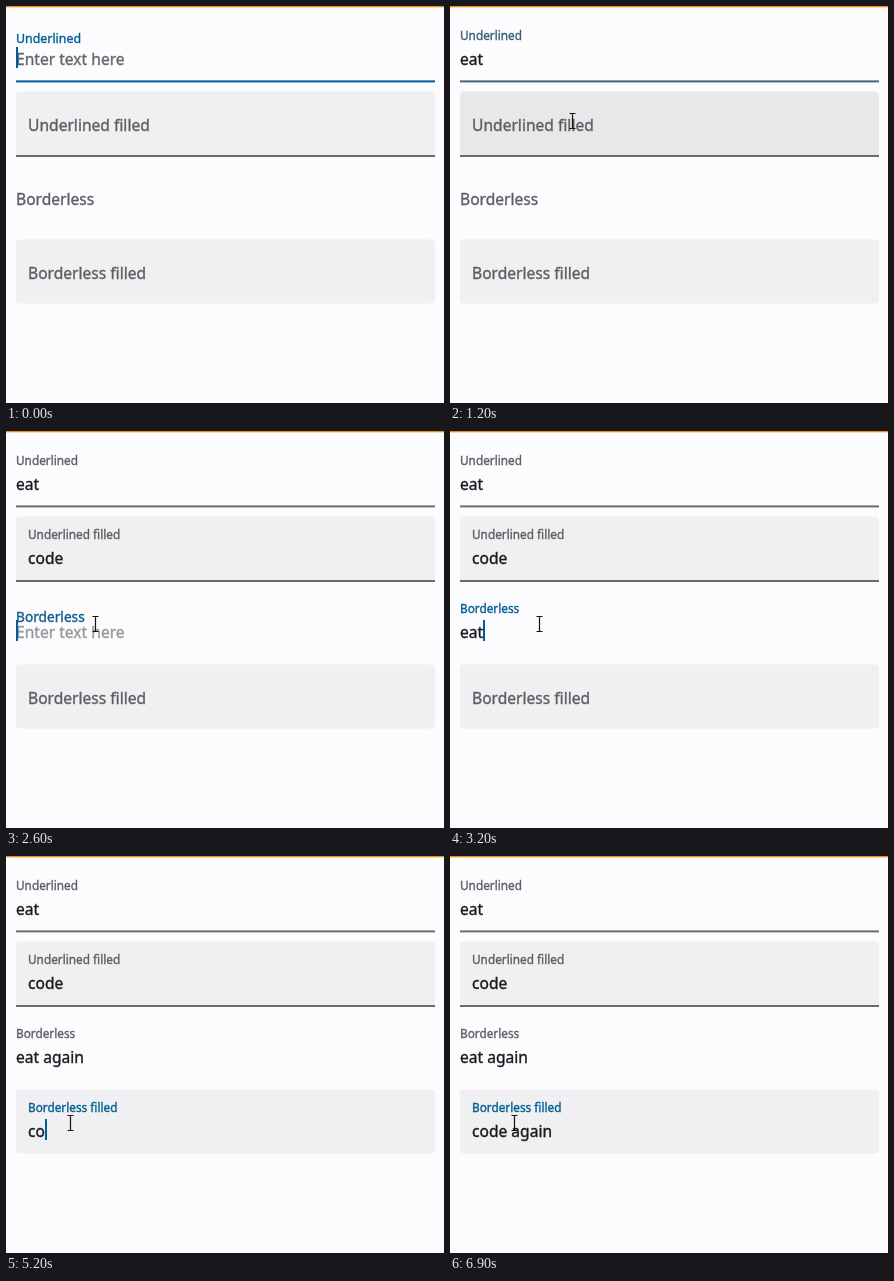
Recreate the animation shown at these times as an HTML page. Size 438 by 397 pixels, loop 7 s.

```html
<!DOCTYPE html>
<html lang="en">
<head>
<meta charset="utf-8">
<title>Text fields</title>
<style>
  html, body { margin: 0; width: 100%; height: 100%; overflow: hidden; background: #fcfcff; }
  svg { display: block; font-family: "Noto Sans", sans-serif; }
  text { white-space: pre; font-size: 15.6px; stroke-width: 0.35px; }
</style>
</head>
<body>
<svg id="stage" width="438" height="397" viewBox="0 0 438 397"></svg>
<script>
const LOOP = 7000, STEP = 100, PITCH = 74;
const BLUE = [0, 93, 147], GRAY = [94, 94, 99], LINE = [107, 106, 111];
const FILL = [240, 240, 242], HOVER = [232, 232, 234];

// keys: [time, typed text]; blinks: [caret off, caret on] intervals
const fields = [
  { label: "Underlined", x: 10, ruleY: 74.4, focus: -150, blur: 1080,
    keys: [[300, "e"], [400, "ea"], [500, "eat"]], blinks: [[700, 1300]] },
  { label: "Underlined filled", x: 22, ruleY: 149, filled: true, hover: [900, 1200], focus: 1200, blur: 2400,
    keys: [[1600, "c"], [1800, "co"], [1900, "cod"], [2000, "code"]], blinks: [[2300, 2500]] },
  { label: "Borderless", x: 10, focus: 2500, blur: 4400,
    keys: [[2900, "e"], [3000, "ea"], [3200, "eat"], [3300, "eat "], [3400, "eat a"],
           [3600, "eat ag"], [3700, "eat aga"], [3800, "eat agai"], [3900, "eat again"]],
    blinks: [[4200, 4500]] },
  { label: "Borderless filled", x: 22, filled: true, hover: [4300, 4500], focus: 4500, blur: LOOP + 1000,
    keys: [[5100, "c"], [5200, "co"], [5300, "cod"], [5500, "code"], [5700, "code "],
           [6100, "code a"], [6400, "code ag"], [6500, "code agai"], [6600, "code again"]],
    blinks: [[4800, 5000], [6900, 7000]] }
];

// pointer stops: [time, x, y]
const stops = [[900, 127, 66], [1100, 122, 115], [2200, 122, 115], [2500, 89, 193],
               [4200, 89, 193], [4300, 89, 194], [4500, 64, 267], [LOOP, 64, 267]];

const stage = document.getElementById("stage");

function add(tag, attrs) {
  const el = document.createElementNS("http://www.w3.org/2000/svg", tag);
  stage.append(el);
  return set(el, attrs);
}
function set(el, attrs) {
  for (const name in attrs) el.setAttribute(name, attrs[name]);
  return el;
}
const ink = color => ({ fill: color, stroke: color });
const ramp = (t, start, length) => Math.min(1, Math.max(0, (t - start) / length));
const smooth = p => p * p * (3 - 2 * p);
const lerp = (a, b, p) => a + (b - a) * p;
const mix = (a, b, p) => `rgb(${a.map((v, i) => Math.round(lerp(v, b[i], p)))})`;
const within = (t, [from, to]) => t >= from && t < to;

add("rect", { width: 438, height: 1.3, fill: "#ee8b16" });

fields.forEach((f, i) => {
  f.y = i * PITCH;
  const { x, y } = f;
  if (f.filled) f.box = add("rect", { x: 10, y: y + 11.5, width: 419, height: 64, rx: 4 });
  if (f.ruleY) {
    if (f.box) f.foot = add("rect", { x: 10, y: f.ruleY - 6, width: 419, height: 6 });
    f.rule = add("rect", { x: 10, y: f.ruleY, width: 419, height: 2 });
  }
  f.hint = add("text", { x, y: y + 59, ...ink("#66666a") });
  f.hint.textContent = "Enter text here";
  f.value = add("text", { x, y: y + 59, ...ink("#1b1b1f") });
  f.caption = add("text", {});
  f.caption.textContent = f.label;
  f.caret = add("rect", { y: y + 41, width: 2, height: 21, fill: mix(BLUE, BLUE, 1) });
});

const pointer = add("path", {
  d: "M-3-7.5h2.5l.5.5l.5-.5H3M0-7V7M-3 7.5h2.5l.5-.5l.5.5H3",
  fill: "none", stroke: "#111", "stroke-width": 1.2
});

function drawField(f, t) {
  const lift = smooth(ramp(t, f.focus, 200));
  const active = ramp(t, f.focus, 120) * (1 - ramp(t, f.blur, 200));
  const key = f.keys.filter(k => k[0] <= t).pop();
  const typed = key ? key[1] : "";

  f.caption.style.fontSize = lerp(15.6, 11.8, lift) + "px";
  set(f.caption, {
    ...ink(mix(GRAY, BLUE, active)),
    transform: `translate(${f.x} ${f.y + lerp(51, 34, lift)})`
  });
  f.value.textContent = typed;
  set(f.hint, { opacity: typed ? 0 : ramp(t, f.focus, 150) });

  const width = typed ? f.value.getComputedTextLength() : 0;
  const caretOn = t > f.focus && t < f.blur && !f.blinks.some(b => within(t, b));
  set(f.caret, { x: Math.round(f.x + width), opacity: caretOn ? 1 : 0 });

  if (f.rule) set(f.rule, { fill: mix(LINE, BLUE, active) });
  if (f.box) {
    const hover = ramp(t, f.hover[0], 150) * (1 - ramp(t, f.hover[1], 150));
    const fill = mix(FILL, HOVER, hover);
    set(f.box, { fill });
    if (f.foot) set(f.foot, { fill });
  }
}

function drawPointer(t) {
  const next = stops.findIndex(s => s[0] > t);
  if (next < 1) return set(pointer, { opacity: 0 });
  const [a, b] = [stops[next - 1], stops[next]];
  const p = smooth(ramp(t, a[0], b[0] - a[0]));
  set(pointer, { opacity: 1, transform: `translate(${lerp(a[1], b[1], p) + 0.5} ${lerp(a[2], b[2], p)})` });
}

const start = performance.now();
function frame() {
  const elapsed = (performance.now() - start) % LOOP;
  const t = Math.floor(elapsed / STEP) * STEP;
  fields.forEach(f => drawField(f, t));
  drawPointer(t);
  requestAnimationFrame(frame);
}
frame();
</script>
</body>
</html>
```
